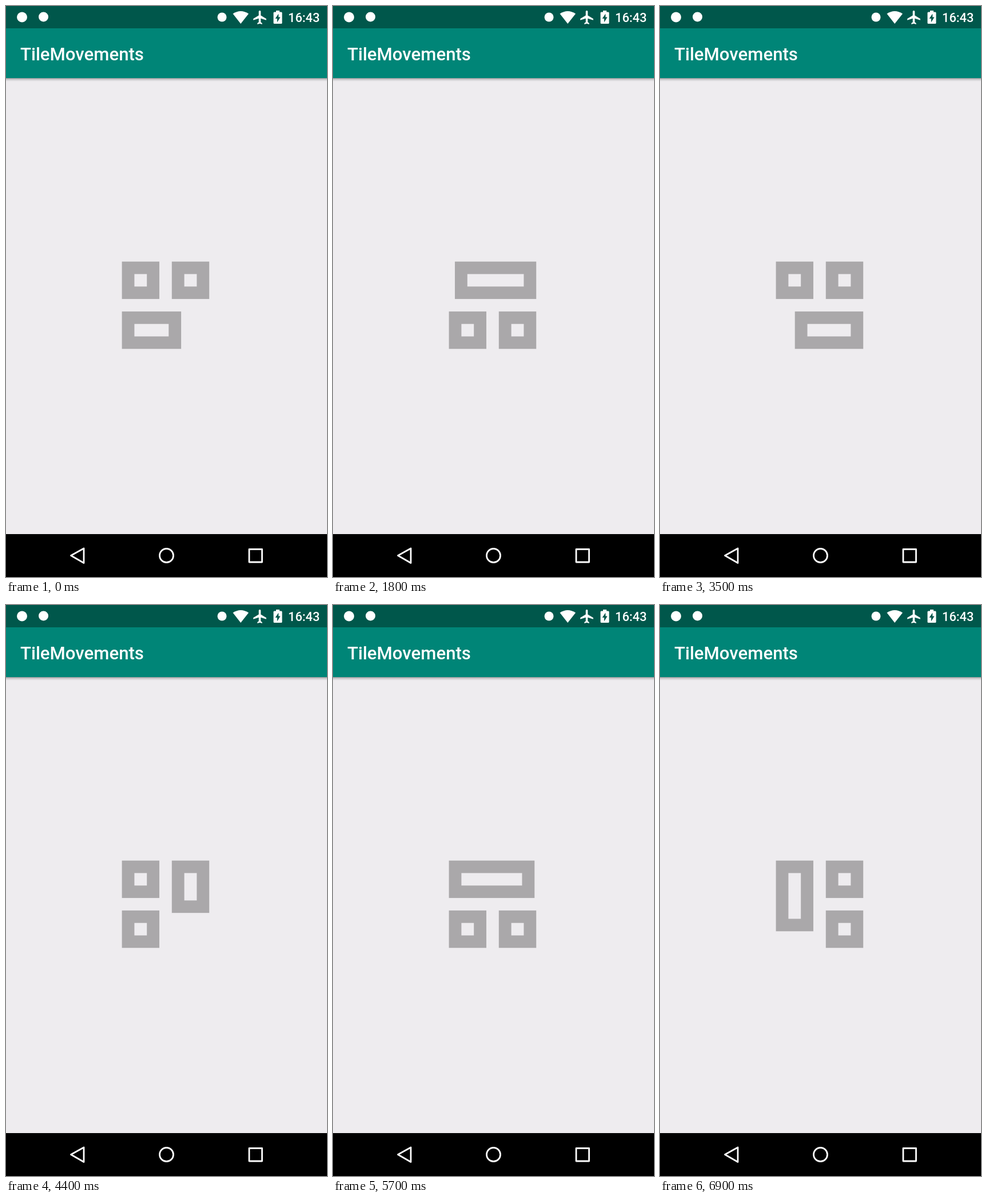
An HTML page that plays this animation: 561 by 998 pixels, repeating every 7 s.

```html
<!DOCTYPE html>
<html lang="en">
<head>
<meta charset="utf-8">
<title>Tile loader</title>
<style>
  html, body { margin: 0; width: 100%; height: 100%; overflow: hidden; background: #eeecef; }
  svg { display: block; width: 561px; height: 998px; }
  text { font-family: Roboto, sans-serif; font-weight: 500; fill: #fff; }
  .tile { fill: none; stroke: #aaa8aa; stroke-width: 21.8; }
  .nav { fill: none; stroke: #fff; stroke-width: 2.8; stroke-linejoin: round; }
</style>
</head>
<body>
<svg viewBox="0 0 561 998">
  <defs>
    <linearGradient id="shade" x2="0" y2="1">
      <stop offset="0" stop-color="#000" stop-opacity=".36"/>
      <stop offset=".4" stop-color="#000" stop-opacity=".14"/>
      <stop offset="1" stop-color="#000" stop-opacity="0"/>
    </linearGradient>
  </defs>

  <rect width="561" height="998" fill="#eeecef"/>
  <rect y="126" width="561" height="6" fill="url(#shade)"/>
  <rect y="39" width="561" height="87" fill="#008577"/>
  <rect width="561" height="39" fill="#00574b"/>
  <text x="25" y="95" font-size="31.17">TileMovements</text>

  <!-- Status bar -->
  <g fill="#fff">
    <circle cx="28" cy="19.5" r="9"/>
    <circle cx="65.5" cy="19" r="8.5"/>
    <circle cx="377.5" cy="19.5" r="8"/>
    <path d="M396.5 13.5Q410.2 4.5 424 13.5L410.2 31Z"/>
    <path transform="translate(429.8 5.7) scale(1.19)" d="M21 16v-2l-8-5V3.5c0-.83-.67-1.5-1.5-1.5S10 2.67 10 3.5V9l-8 5v2l8-2.5V19l-2 1.5V22l3.5-1 3.5 1v-1.5L13 19v-5.5l8 2.5z"/>
    <path d="M472 8h6v2.5h3q1.5 0 1.5 1.5v17.5q0 1.5-1.5 1.5h-12q-1.5 0-1.5-1.5V12q0-1.5 1.5-1.5h3z"/>
    <path d="M476.3 13.5v6h3.2l-5.6 9v-6.6h-3.3z" fill="#00574b"/>
  </g>
  <text x="493" y="28" font-size="21.8">16:43</text>

  <!-- Navigation bar -->
  <rect y="923" width="561" height="75" fill="#000"/>
  <path class="nav" d="M113.5 960.5L136 948v25.5z"/>
  <circle class="nav" cx="280.5" cy="960.5" r="12"/>
  <rect class="nav" x="425" y="949.5" width="22.5" height="22.5"/>

  <rect class="tile"/>
  <rect class="tile"/>
  <rect class="tile"/>
</svg>
<script>
  const LOOP = 7000, STEP = 100;
  const UNIT = 21.8, LEFT = 202.6, TOP = 446.7;
  const tiles = document.querySelectorAll('.tile');
  const ring = [[0, 0], [1, 0], [1, 1], [0, 1]];   // cells, clockwise

  // [time, half moves done]: close to two per second, slightly uneven
  const pace = [[0, 1.563], [1100, 3.736], [2600, 6.7], [3500, 8.62],
                [4400, 10.299], [5700, 12.966], [6900, 15.333]];

  const cell = i => ring[(i % 4 + 4) % 4];
  const mix = (a, b, k) => a + (b - a) * k;
  const between = (a, b, k) => [mix(a[0], b[0], k), mix(a[1], b[1], k)];

  function progress(t) {
    const i = pace.findIndex(p => p[0] >= t) || 1;
    const [t0, u0] = pace[i - 1], [t1, u1] = pace[i];
    return mix(u0, u1, (t - t0) / (t1 - t0));
  }

  // A tile covers everything from cell a to cell b.
  function place(tile, a, b) {
    const set = (name, value) => tile.setAttribute(name, value);
    set('x', LEFT + UNIT * (4 * Math.min(a[0], b[0]) + 0.5));
    set('y', TOP + UNIT * (4 * Math.min(a[1], b[1]) + 0.5));
    set('width', UNIT * (4 * Math.abs(a[0] - b[0]) + 2));
    set('height', UNIT * (4 * Math.abs(a[1] - b[1]) + 2));
  }

  function draw(now) {
    const u = progress(Math.floor(now % LOOP / STEP) * STEP);
    const move = Math.floor(u / 2), phase = u % 2;
    const i = 2 - move, from = cell(i), to = cell(i + 1);

    // Stretch into the free cell, then pull the tail in.
    place(tiles[0], between(from, to, Math.max(phase - 1, 0)),
                    between(from, to, Math.min(phase, 1)));
    place(tiles[1], cell(i + 2), cell(i + 2));
    place(tiles[2], cell(i + 3), cell(i + 3));
  }

  function tick() {
    draw(performance.now());
    requestAnimationFrame(tick);
  }
  tick();
</script>
</body>
</html>
```
